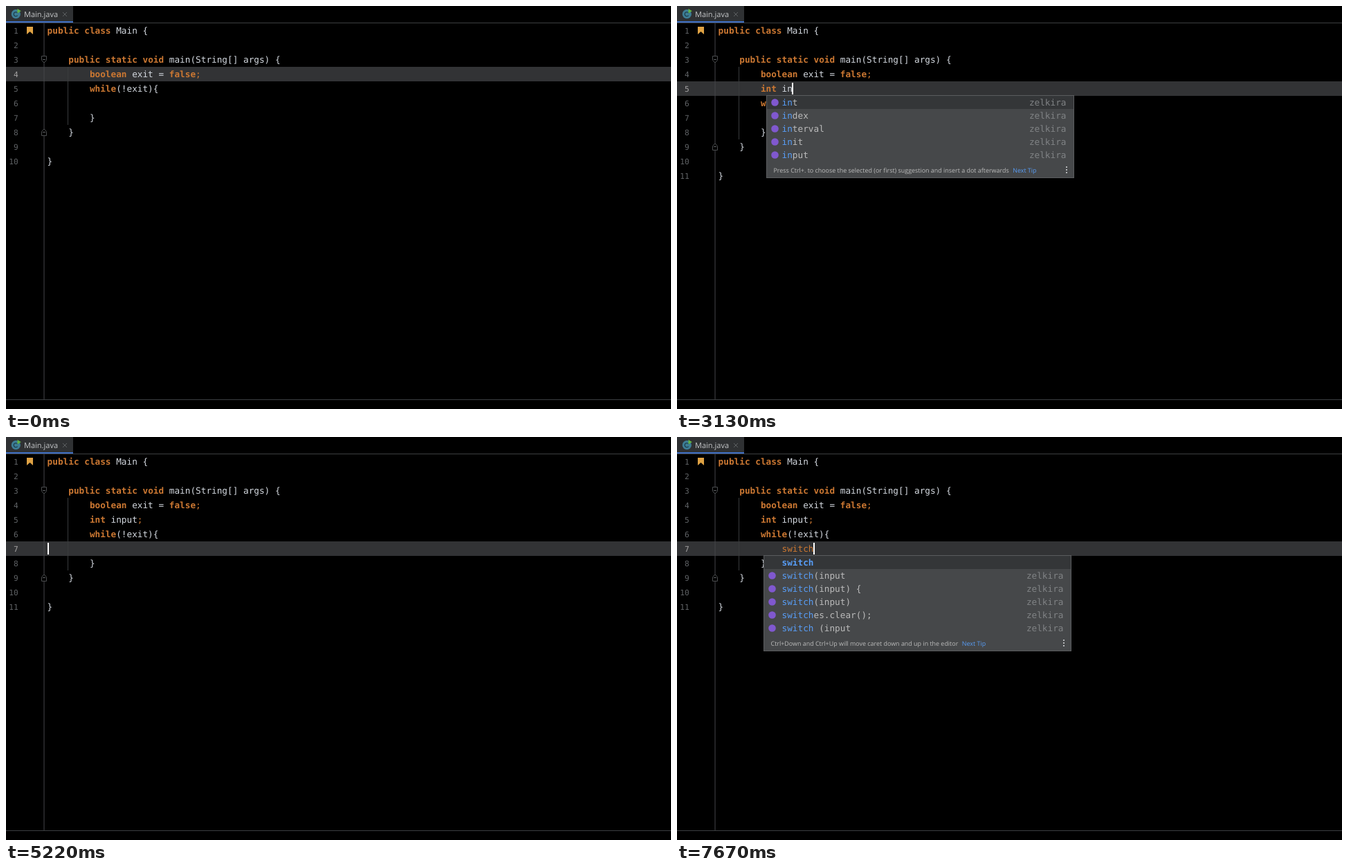
These frames come from a looping animation (961 px wide and 583 px high, 8000 ms). An HTML page:

```html
<!DOCTYPE html>
<html lang="en">
<head>
<meta charset="utf-8">
<title>Code editor</title>
<style>
html, body { margin: 0; width: 100%; height: 100%; overflow: hidden; background: #000; }
svg { display: block; width: 961px; height: 583px; }
text { white-space: pre; text-rendering: geometricPrecision; }
.code { font: 12.72px "DejaVu Sans Mono", monospace; fill: #d3d8df; }
.num { font: 11.2px "DejaVu Sans Mono", monospace; fill: #606366; text-anchor: end; }
.num.on { fill: #a4a3a3; }
.key { fill: #cc7832; }
.bold { font-weight: bold; }
.item { fill: #bbbbbb; }
.match { fill: #589df6; }
.label { fill: #808385; text-anchor: end; }
.tip { font: 8.93px "Open Sans", sans-serif; fill: #bbbbbb; }
.tab { font: 11px "Open Sans", sans-serif; fill: #c4c6c8; }
</style>
</head>
<body>
<svg viewBox="0 0 961 583">
  <rect width="961" height="583"/>
  <rect width="97" height="24" fill="#2f3133"/>
  <path d="M0 24.5H961M0 569.5H961" stroke="#3c3f41"/>
  <rect y="22" width="97" height="2" fill="#3f6fc4"/>
  <circle cx="14.3" cy="11.7" r="6.6" fill="#3d7d95"/>
  <path d="M16.6 10a3 3 0 1 0 0 3.6" fill="none" stroke="#1f404d" stroke-width="1.3"/>
  <path d="M16.5 4l5.3 3.2-5.3 3.2z" fill="#62b543"/>
  <text class="tab" x="26" y="16">Main.java</text>
  <path d="M82 9l6 6m0-6l-6 6" stroke="#5d6062"/>
  <g id="view"></g>
</svg>
<script>
const LOOP = 8000, ADV = 7.66, ROW = 21, ITEM = 19;
const KEYWORDS = /\b(?:public|class|static|void|boolean|false|while|int|switch)\b|;/g;
const VENDOR = "zelkira";

const TIP_DOT = "Press Ctrl+. to choose the selected (or first) suggestion and insert a dot afterwards";
const TIP_SPACE = "Press Ctrl+Space to see non-imported classes";
const TIP_MOVE = "Ctrl+Down and Ctrl+Up will move caret down and up in the editor";

// Items starting with * come from the editor itself: bold, no vendor.
const list = (names, tip, pad = 22, rows) => {
  const items = names.split("|");
  return { items, tip, pad, rows: rows || items.length };
};
const exitItems = "int exitCode =|int exitCode|int exit|int exitCode = 0;|int exitCode = 0";
const typeFirst = list(exitItems + "|int|if", TIP_DOT);
const typeNext = list(exitItems, TIP_DOT);
const nameFirst = list("int|index|interval|init|input", TIP_DOT);
const nameNext = list("input|inputs|inputLine|inputStream|inputString", TIP_DOT);
const wordFirst = list("static|*switch|super|switch|short|strictfp|*synchronized|String|System|StringBuilder|Short|Scanner", TIP_SPACE, 26, 11.5);
const wordNext = list("static|*switch|super|switch|short|strictfp", TIP_SPACE, 26);
const wordLast = list("*switch|switch(input|switch(input) {|switch(input)|switches.clear();|switch (input", TIP_MOVE, 26);

// time, changes to the state: row, col, caret, decl, body, word start, popup
const steps = [
  [0, { row: 4, col: 29, caret: false, decl: null, body: "", from: 8, popup: null, usages: false }],
  [330, { caret: true }],
  [500, { row: 5, col: 8, decl: "" }],
  [1270, { decl: "i" }],
  [1310, { popup: typeFirst }],
  [1430, { decl: "in" }],
  [1470, { popup: typeNext }],
  [1600, { decl: "int" }],
  [1760, { decl: "int " }],
  [1800, { popup: null }],
  [2330, { caret: false }],
  [2800, { caret: true }],
  [3000, { decl: "int i", from: 12 }],
  [3040, { popup: nameFirst }],
  [3090, { decl: "int in" }],
  [3260, { decl: "int inp" }],
  [3300, { popup: nameNext }],
  [3340, { decl: "int inpu" }],
  [3470, { decl: "int input" }],
  [4280, { decl: "int input;" }],
  [4320, { popup: null }],
  [4920, { row: 6, col: 18, usages: true }],
  [5220, { row: 7, col: 0, usages: false }],
  [5630, { col: 4 }],
  [5800, { col: 8 }],
  [6040, { col: 12 }],
  [6680, { body: "s" }],
  [6720, { popup: wordFirst }],
  [6840, { body: "sw" }],
  [6880, { popup: wordNext }],
  [7220, { body: "swi" }],
  [7260, { popup: wordLast }],
  [7350, { body: "swit" }],
  [7480, { body: "switc" }],
  [7600, { body: "switch" }]
];

const view = document.getElementById("view");
const colX = col => 59.6 + col * ADV;
const rowY = row => 25 + (row - 1) * ROW;
const esc = s => s.replace(/&/g, "&amp;").replace(/</g, "&lt;");
const span = (cls, s) => `<tspan class="${cls}">${esc(s)}</tspan>`;
const rect = (x, y, w, h, fill) => `<rect x="${x}" y="${y}" width="${w}" height="${h}" fill="${fill}"/>`;

function codeLine(line, row, caretCol) {
  const body = line.trimStart(), indent = line.length - body.length;
  // A keyword stays in normal weight while the caret touches its end.
  const html = body.replace(KEYWORDS, (word, at) => {
    const plain = word === ";" || indent + at + word.length === caretCol;
    return span(plain ? "key" : "key bold", word);
  });
  return `<text class="code" x="${colX(indent)}" y="${rowY(row) + 15}">${html}</text>`;
}

function foldMark(y, dir) {
  return `<path d="M51.5 ${y - 5 * dir}h7v${6 * dir}l-3.5 ${3.5 * dir}l-3.5 ${-3.5 * dir}z" fill="#000" stroke="#4b4d4f"/>
    <path d="M53 ${y}h4" stroke="#606366"/>`;
}

function drawPopup({ items, tip, pad, rows }, row, from, typed) {
  const left = Math.floor(colX(from) - pad), top = rowY(row) + 20;
  const listEnd = top + 1 + ITEM * rows, height = 25 + ITEM * rows;
  let out = rect(left, top, 445, height, "#46484a") + rect(left + 1, top + 1, 443, ITEM, "#343638");
  items.forEach((raw, i) => {
    const own = raw[0] === "*", name = own ? raw.slice(1) : raw;
    const y = top + 15 + ITEM * i, cut = name.startsWith(typed) ? typed.length : 0;
    out += `<text class="code item${own ? " bold" : ""}" x="${colX(from)}" y="${y}">${span("match", name.slice(0, cut))}${esc(name.slice(cut))}</text>`;
    if (!own) {
      out += `<circle cx="${left + 12.5}" cy="${y - 4.5}" r="5.3" fill="#8058cf"/>
        <text class="code label" x="${left + 433.5}" y="${y}">${VENDOR}</text>`;
    }
  });
  out += rect(left + 1, listEnd, 443, 23, "#46484a");
  out += `<text class="tip" x="${left + 10.5}" y="${listEnd + 16}">${tip}<tspan class="match" dx="5.5">Next Tip</tspan></text>`;
  for (const d of [-4, 0, 4]) out += rect(left + 433, listEnd + 11 + d, 2, 2, "#b4b6b8");
  return out + `<rect x="${left + 0.5}" y="${top + 0.5}" width="444" height="${height - 1}" fill="none" stroke="#5a5c5e"/>`;
}

function draw(s) {
  const added = s.decl !== null;
  const lines = [
    "public class Main {", "",
    "    public static void main(String[] args) {",
    "        boolean exit = false;",
    ...(added ? ["        " + s.decl] : []),
    "        while(!exit){",
    s.body ? " ".repeat(12) + s.body : "",
    "        }", "    }", "", "}"
  ];
  const active = s.row === 5 ? lines[4] : s.row === 7 ? lines[6] : "";
  const col = active.trim() ? active.length : s.col;
  const closeRow = lines.length - 2;

  let out = rect(0, rowY(s.row), 961, ROW, "#323335");
  if (s.usages) {
    out += rect(colX(16), rowY(4), 4 * ADV, ROW, "#40332b");
    out += rect(colX(15), rowY(6), 4 * ADV, ROW, "#344134");
  }
  out += `<path d="M55.5 25V569" transform="translate(-.5)" stroke="#45474a"/>
    <path d="M89.5 88V${rowY(closeRow)}" stroke="#393b3c"/>
    <path d="M30 30h9v11l-4.5-4-4.5 4z" fill="#dfa244"/>`;
  out += foldMark(77.5, 1) + foldMark(rowY(closeRow) + 10.5, -1);
  lines.forEach((line, i) => {
    const row = i + 1, on = row === s.row;
    out += `<text class="num${on ? " on" : ""}" x="17.7" y="${rowY(row) + 15}">${row}</text>`;
    if (line) out += codeLine(line, row, on ? col : -1);
  });
  if (s.caret) out += rect(Math.max(60, Math.floor(colX(col))), rowY(s.row) + 2, 2, 17, "#fff");
  if (s.popup) out += drawPopup(s.popup, s.row, s.from, active.slice(s.from));
  view.innerHTML = out;
}

let shown = -1;
function tick(now) {
  const t = now % LOOP;
  const count = steps.filter(([at]) => at <= t).length;
  if (count !== shown) {
    shown = count;
    draw(Object.assign({}, ...steps.slice(0, count).map(([, change]) => change)));
  }
  requestAnimationFrame(tick);
}
const start = performance.now();
tick(0);
function frame() { return performance.now() - start; }
const rawTick = tick;
tick = () => rawTick(frame());
</script>
</body>
</html>
```
